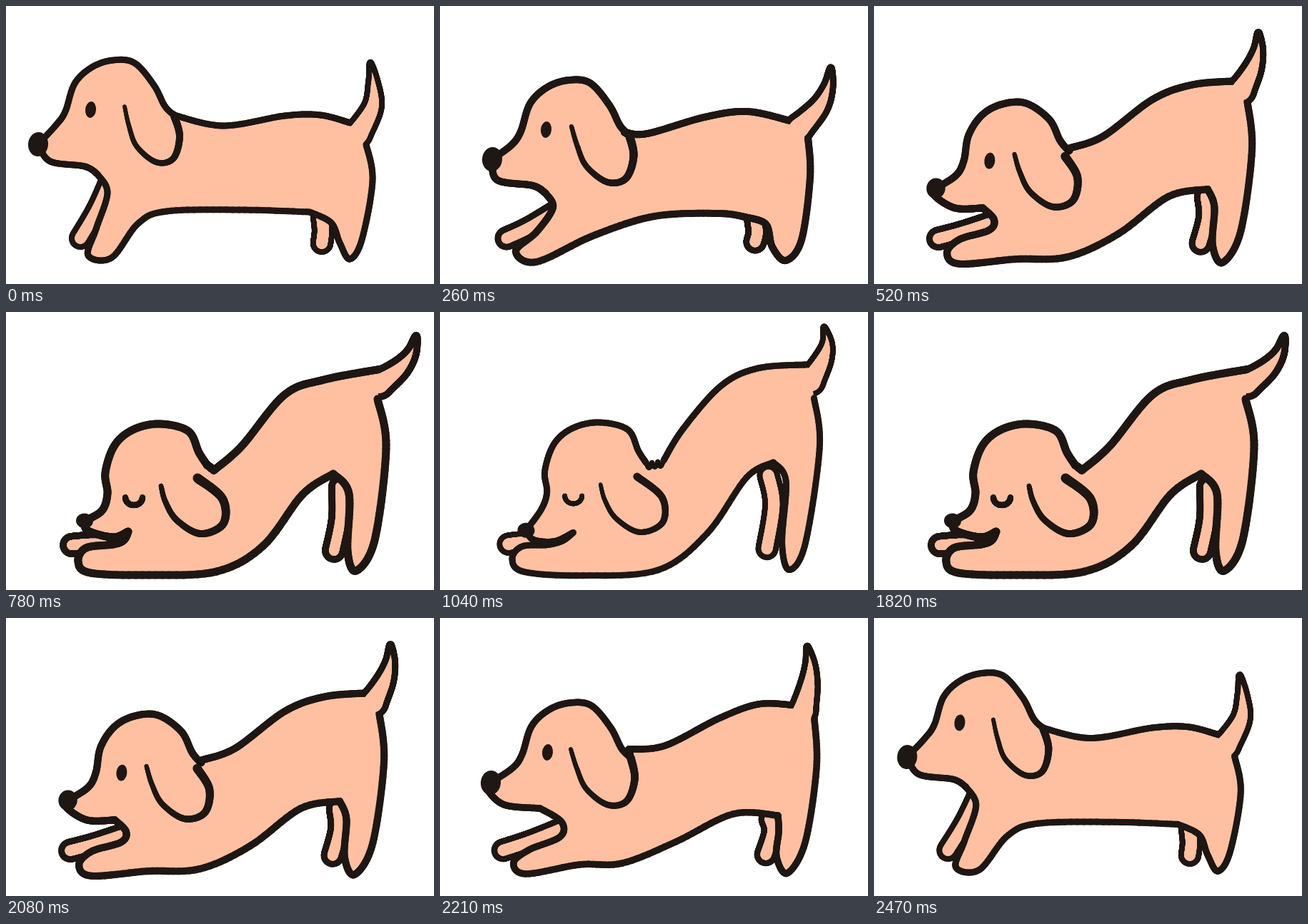
An HTML page with a canvas for the animation above (2.54 s loop, 599 by 390 pixels).

```html
<!DOCTYPE html>
<html lang="en">
<head>
<meta charset="utf-8">
<title>Stretching dog</title>
<style>
html, body { margin: 0; width: 100%; height: 100%; overflow: hidden; background: #fff; }
canvas { display: block; }
</style>
</head>
<body>
<canvas id="stage" width="599" height="390"></canvas>
<script>
const ctx = document.getElementById('stage').getContext('2d');
const INK = '#1e1713', SKIN = '#ffc0a2';
const LOOP = 2540, TICK = 130, SAMPLES = 100;
const LEG = 24;

// Two faces; each pose only shifts one of them.
const awake = {
  head: '70,167 83,148 96,109 120,86 150,76 180,80 207,111 222,140 235,153',
  ear: '235,153 243,183 234,214 210,219 183,197 172,168 166,141',
  eye: '118.5,145.5', noseSize: '14,17'
};
const asleep = {
  head: '134,279 142,255 139,225 152,187 178,165 215,157 255,167 270,197 281,214',
  ear: '268,233 303,262 304,297 272,311 239,292 223,266 217,244',
  eye: '179,260', noseSize: '12,10.5'
};

// Key points the brush runs through; legs and tail are centre lines.
const poses = [
  { // standing
    face: awake, shift: [0, 0], sway: 0, pen: 9, wrinkle: 0, nose: '45,194',
    back: '235,153 304,168 390,154 440,153 482,164',
    tail: '492,180 513,142 514,108 510,80',
    hind: '504,194 513,245 498,328 481,355 467,332 455,304 425,289',
    belly: '425,289 330,286 225,288 185,305 148,353 115,350 126,313 142,262 128,236',
    jaw: '128,236 110,225 62,218',
    farFront: '148,240 128,285 104,326',
    farHind: '442,295 444,315 442,333'
  },
  { // crouching
    face: awake, shift: [30, 28], sway: -12, pen: 10, wrinkle: 0, nose: '73,215',
    back: '258,177 290,179 370,156 430,148 490,161',
    tail: '502,172 530,142 543,114 547,87',
    hind: '515,184 518,240 506,328 484,357 465,338 456,306 427,296',
    belly: '427,296 390,291 300,295 215,322 135,359 106,344 135,317 158,283 148,263',
    jaw: '148,263 130,252 80,244',
    farFront: '168,285 125,311 93,326',
    farHind: '442,300 444,318 441,331'
  },
  { // rump rising
    face: awake, shift: [32, 43], sway: -15, pen: 9.5, wrinkle: 0, nose: '71,231',
    back: '264,184 315,179 390,141 445,121 493,122',
    tail: '508,131 516,95 518,65 514,40',
    hind: '524,141 527,210 511,315 486,358 471,335 474,300 473,277',
    belly: '473,277 410,275 330,314 255,344 195,346 120,359 103,343 125,325 168,307 170,286 140,267',
    jaw: '140,267 90,262 66,240',
    farFront: '184,290 130,312 88,326',
    farHind: '462,282 466,300 456,332'
  },
  { // deep stretch
    face: asleep, shift: [0, 0], sway: 0, pen: 11, wrinkle: 0, nose: '110,293',
    back: '291,222 330,188 390,116 445,95 525,80',
    tail: '522,101 550,80 567,58 574,34',
    hind: '520,122 532,190 516,320 490,363 478,335 480,255 458,227',
    belly: '458,227 415,256 360,328 295,364 200,369 118,366 101,350 112,331 150,326 165,320 171,308',
    jaw: '171,308 150,316 115,307',
    farFront: '135,325 115,325 92,327',
    farHind: '468,245 468,290 459,335'
  },
  { // shoulders pulled in
    face: asleep, shift: [11, -3], sway: 0, pen: 8, wrinkle: 10, nose: '125,312',
    back: '322,203 345,153 395,98 445,72 512,71',
    tail: '517,96 529,62 531,38 522,16',
    hind: '525,120 531,190 509,328 488,361 479,320 486,230 470,204',
    belly: '470,204 435,222 380,303 310,361 200,370 118,364 101,345 116,328 150,327 175,321 193,310',
    jaw: '193,310 165,324 138,325',
    farFront: '130,324 112,323 97,325',
    farHind: '456,222 467,262 457,331'
  }
];

// Place on the way from standing to the longest stretch; the loop then runs back.
const steps = [0, 0.05, 1, 2, 2.4, 2.78, 3, 3.35, 3.7, 4, 3.94];

const parse = text => text.split(' ').map(p => p.split(',').map(Number));
const mix = (a, b, f) => a + (b - a) * f;

// Catmull-Rom value through a list at u in 0..1
function spline(list, u) {
  const last = list.length - 1;
  const i = Math.min(Math.floor(u * last), last - 1), f = u * last - i;
  const at = j => list[Math.min(Math.max(j, 0), last)];
  const a = at(i - 1), b = at(i), c = at(i + 1), d = at(i + 2);
  return b + f / 2 * (c - a + f * (2 * a - 5 * b + 4 * c - d + f * (3 * (b - c) + d - a)));
}

function along(point) {
  return Array.from({ length: SAMPLES + 1 }, (_, i) => point(i / SAMPLES));
}

function curve(points) {
  return along(u => [0, 1].map(k => spline(points.map(p => p[k]), u)));
}

// Every entry becomes a list of pairs, so that two poses blend alike.
function build(pose) {
  const { face, shift, sway } = pose;
  const place = text => parse(text).map(([x, y]) => [x + shift[0], y + shift[1]]);
  const nose = parse(pose.nose);
  const dog = {
    nose,
    noseSize: parse(face.noseSize),
    eye: place(face.eye),
    style: [[pose.pen, pose.wrinkle]],
    head: curve([...nose, ...place(face.head)]),
    ear: curve(place(face.ear).map(([x, y], i, all) => [x + sway * i / (all.length - 1), y])),
    jaw: curve([...parse(pose.jaw), ...nose])
  };
  for (const part of ['back', 'tail', 'hind', 'belly', 'farFront', 'farHind']) {
    dog[part] = curve(parse(pose[part]));
  }
  return dog;
}

function poseAt(place) {
  const i = Math.min(Math.floor(place), poses.length - 2);
  const from = build(poses[i]), to = build(poses[i + 1]);
  const dog = { closed: place > 2.5 };
  for (const part in from) {
    dog[part] = from[part].map((p, j) => p.map((v, k) => mix(v, to[part][j][k], place - i)));
  }
  return dog;
}

function brush(points, width, color = INK) {
  ctx.strokeStyle = color;
  points.slice(1).forEach((p, i) => {
    ctx.lineWidth = Math.max(width(i / SAMPLES), 0.01);
    ctx.beginPath();
    ctx.moveTo(...points[i]);
    ctx.lineTo(...p);
    ctx.stroke();
  });
}

function blob([x, y], [rx, ry]) {
  ctx.fillStyle = INK;
  ctx.beginPath();
  ctx.ellipse(x, y, rx, ry, 0.1, 0, 2 * Math.PI);
  ctx.fill();
}

// Line from head to back, gathered into folds when the shoulders pull in
function neckOf(dog, wrinkle) {
  const [x1, y1] = dog.head.at(-1), [x2, y2] = dog.back[0];
  return along(u => [
    mix(x1, x2, u),
    mix(y1, y2, u) + wrinkle * Math.abs(Math.sin(3 * Math.PI * u))
  ]);
}

function draw(dog) {
  const [pen, wrinkle] = dog.style[0];
  const neck = neckOf(dog, wrinkle);
  const line = () => pen;
  const taper = u => mix(36, 2, u);

  ctx.fillStyle = '#fff';
  ctx.fillRect(0, 0, 599, 390);
  ctx.lineCap = 'round';

  for (const leg of [dog.farFront, dog.farHind]) {
    brush(leg, () => LEG + pen * 0.9);
    brush(leg, () => LEG - pen * 0.9, SKIN);
  }
  brush(dog.tail, u => taper(u) + pen * 0.9);

  ctx.fillStyle = SKIN;
  ctx.beginPath();
  for (const part of [dog.head, neck, dog.back, dog.hind, dog.belly, dog.jaw]) {
    for (const p of part) ctx.lineTo(...p);
  }
  ctx.fill();

  for (const part of ['head', 'back', 'hind', 'belly', 'jaw']) brush(dog[part], line);
  brush(neck, () => pen * (1 - wrinkle / 25));
  brush(dog.tail, u => taper(u) - pen * 0.9, SKIN);
  brush(dog.ear, u => pen * mix(1.2, 0.6, u));
  blob(dog.nose[0], dog.noseSize[0]);

  const [x, y] = dog.eye[0];
  if (dog.closed) {
    const lid = along(u => [x - 12 * Math.cos(Math.PI * u), y + 11 * Math.sin(Math.PI * u)]);
    brush(lid, () => pen * 0.75);
  } else {
    blob([x, y], [7.5, 11.5]);
  }
}

const dogs = steps.map(poseAt);
let start;

function frame(now) {
  start ??= now;
  const tick = Math.floor((now - start) % LOOP / TICK);
  draw(dogs[Math.min(tick, 20 - tick)]);
  requestAnimationFrame(frame);
}
requestAnimationFrame(frame);
</script>
</body>
</html>
```
